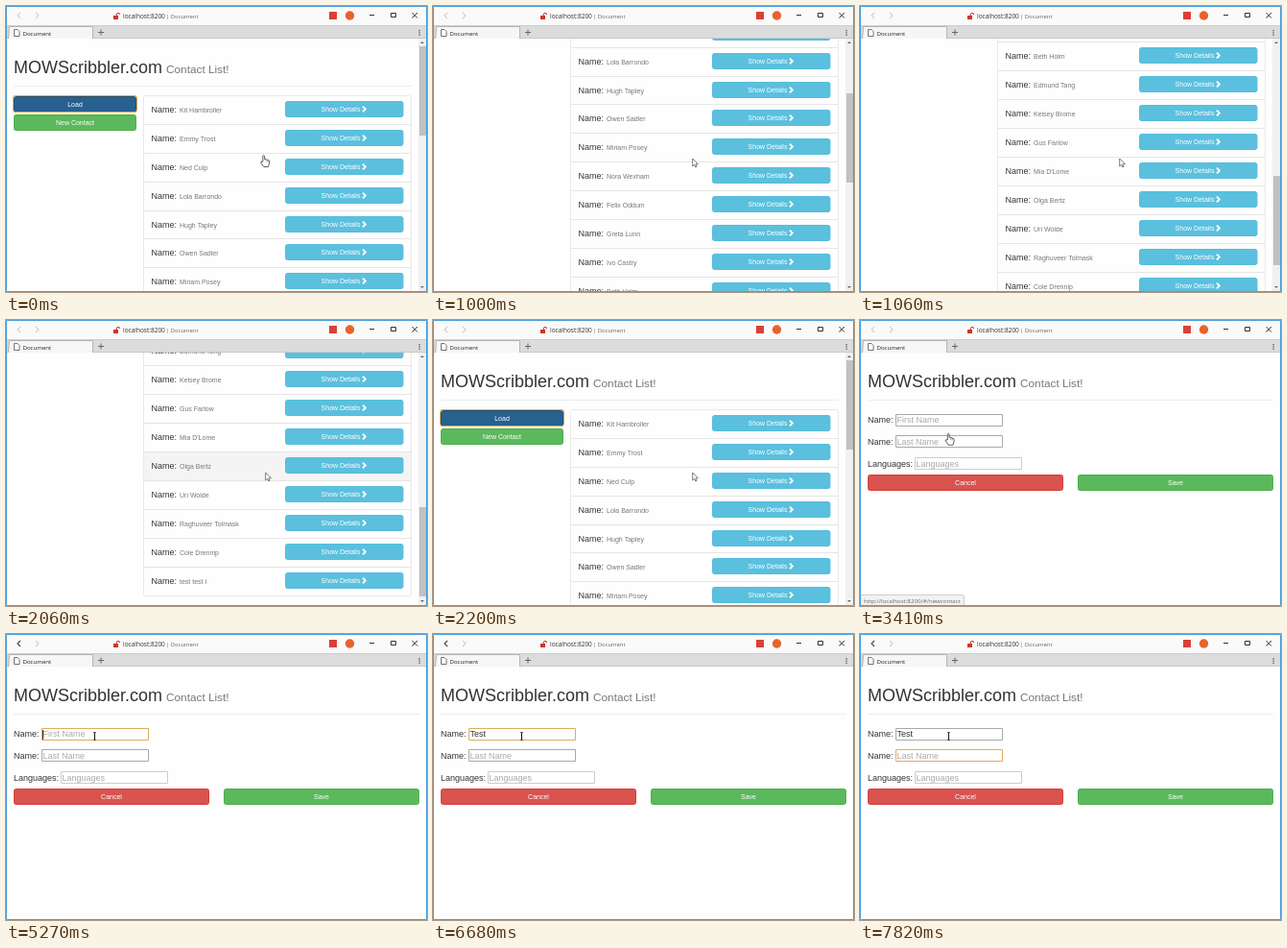
These frames come from a looping animation (439 by 298 pixels, 8 s). An HTML page with a canvas:

```html
<!DOCTYPE html>
<html lang="en">
<head>
<meta charset="utf-8">
<title>Document</title>
<style>
  html, body { margin: 0; width: 100%; height: 100%; overflow: hidden; background: #fefefe; }
  canvas { display: block; width: 439px; height: 298px; }
</style>
</head>
<body>
<canvas id="stage"></canvas>
<script>
const W = 439, H = 298, LOOP = 8000;
const SANS = '"Liberation Sans", Arial, sans-serif';
const UI = '"Open Sans", "Noto Sans", sans-serif';
const canvas = document.getElementById('stage');
const ctx = canvas.getContext('2d');
const dpr = window.devicePixelRatio || 1;
canvas.width = W * dpr;
canvas.height = H * dpr;

const PAGE_TOP = 34, LIST_TOP = 93.7, PITCH = 29.95, MAX_SCROLL = 435;
const people = [
  'Kit Hambroller', 'Emmy Trost', 'Ned Culp', 'Lola Barrondo', 'Hugh Tapley',
  'Owen Sadler', 'Miriam Posey', 'Nora Wexham', 'Felix Oddum', 'Greta Lunn',
  'Ivo Castry', 'Beth Holm', 'Edmund Tang', 'Kelsey Brome', 'Gus Farlow',
  'Mia D\'Lome', 'Olga Bertz', 'Uri Wolde', 'Raghuveer Tolmask', 'Cole Drennip',
  'test test l'
];

// Step tracks: [start time, value]
const scrollTrack = [
  [0, 0], [1000, 140], [1030, 275], [1060, 385], [1100, 421], [1130, MAX_SCROLL],
  [2100, 300], [2130, 150], [2160, 40], [2200, 0]
];
const typedTrack = [[0, ''], [5510, 'T'], [5620, 'Te'], [5790, 'Tes'], [6170, 'Test']];
const caretTrack = [
  [0, false], [4270, true], [4790, false], [5270, true], [5790, false],
  [6000, true], [6680, false], [7310, true], [7820, false]
];

function at(track, t) {
  let value = track[0][1];
  for (const [start, v] of track) if (t >= start) value = v;
  return value;
}

// Eased 0..1 progress, advanced in a number of discrete steps
function glide(t, start, end, steps) {
  if (t < start) return 0;
  if (t >= end) return 1;
  const q = (Math.floor((t - start) / (end - start) * (steps - 1)) + 1) / steps;
  return q * q * (3 - 2 * q);
}

const mix = (a, b, p) => a + (b - a) * p;

function text(s, x, y, size, color, align = 'left', font = SANS) {
  ctx.font = `${size}px ${font}`;
  ctx.fillStyle = color;
  ctx.textAlign = align;
  ctx.fillText(s, x, y);
}

function rect(x, y, w, h, color) {
  ctx.fillStyle = color;
  ctx.fillRect(x, y, w, h);
}

function box(x, y, w, h, fill, stroke, r = 0) {
  ctx.beginPath();
  ctx.roundRect(x + 0.5, y + 0.5, w - 1, h - 1, r);
  if (fill) { ctx.fillStyle = fill; ctx.fill(); }
  if (stroke) { ctx.strokeStyle = stroke; ctx.lineWidth = 1; ctx.stroke(); }
}

function path(points, color, line = 1, fill, closed) {
  ctx.beginPath();
  points.forEach(([x, y], i) => i ? ctx.lineTo(x, y) : ctx.moveTo(x, y));
  if (closed) ctx.closePath();
  if (fill) { ctx.fillStyle = fill; ctx.fill(); }
  if (color) { ctx.strokeStyle = color; ctx.lineWidth = line; ctx.stroke(); }
}

function button(label, x, y, w, fill, stroke, labelX = x + w / 2) {
  box(x, y, w, 17, fill, stroke, 2);
  text(label, labelX, y + 11, 7, '#fff', 'center');
}

function chrome(backActive) {
  rect(0, 0, W, 20, '#fafafa');
  rect(0, 20, W, 14, '#dcdcdc');
  rect(0, 20, W, 1, '#cdcdcd');
  rect(0, 33, W, 1, '#c8c8c8');

  path([[15, 7], [12, 10], [15, 13]], backActive ? '#444' : '#d0d0d0', 1.1);
  path([[31, 7], [34, 10], [31, 13]], '#d0d0d0', 1.1);

  rect(112, 10, 5, 4, '#c9382b');
  ctx.beginPath();
  ctx.arc(117, 9, 1.7, Math.PI, 0);
  ctx.moveTo(115.3, 9);
  ctx.lineTo(115.3, 10.5);
  ctx.strokeStyle = '#c9382b';
  ctx.lineWidth = 1;
  ctx.stroke();
  text('localhost:8200', 122, 13, 6.5, '#333', 'left', UI);
  text('| Document', 167, 13, 5.9, '#666', 'left', UI);

  rect(337, 6, 8, 8, '#d8413a');
  ctx.beginPath();
  ctx.arc(358.5, 10, 4.7, 0, Math.PI * 2);
  ctx.fillStyle = '#e8622c';
  ctx.fill();

  rect(379, 9, 5, 1, '#333');
  box(401, 7, 6, 5, null, '#333');
  path([[423.5, 7], [429, 12.5]], '#333');
  path([[429, 7], [423.5, 12.5]], '#333');

  path([[2.5, 34], [3.5, 21.5], [90.5, 21.5], [90.5, 34]], '#b5b5b5', 1, '#f6f6f6');
  path([[8.5, 24.5], [12, 24.5], [14, 26.5], [14, 31.5], [8.5, 31.5]], '#666', 0.9, '#fff', true);
  text('Document', 17.5, 31, 6.1, '#222', 'left', UI);
  rect(96, 27, 6, 1, '#666');
  rect(98.5, 24.5, 1, 6, '#666');
  for (const y of [25, 27.3, 29.6]) rect(430.5, y, 1.3, 1.3, '#555');
}

function header(right) {
  text('MOWScribbler.com', 8, 69.7, 18, '#333');
  text('Contact List!', 167, 69.7, 11.8, '#777');
  rect(8, 83, right - 8, 1, '#ececec');
}

function contactRow(name, i, hovered) {
  const y = Math.round(LIST_TOP + i * PITCH);
  if (hovered) rect(144, y, 279, Math.round(PITCH), '#f4f4f5');
  if (i) rect(144, y - 1, 279, 1, '#e6e6e6');
  text('Name:', 151.5, y + 17, 9, '#333');
  text(name, 181, y + 17, 7, '#777');
  button('Show Details', 291, y + 5, 123.5, '#5bc0de', '#56bddc', 349);
  path([[372, y + 10.7], [374.8, y + 13.5], [372, y + 16.3]], '#fff', 1.9);
}

function scrollbar(scroll) {
  rect(430, PAGE_TOP, 8, H - PAGE_TOP, '#f1f1f1');
  rect(431, Math.round(42 + scroll / MAX_SCROLL * 153), 7, 93, '#c1c1c1');
  path([[432, 39], [434, 37], [436, 39]], null, 0, '#666', true);
  path([[432, 292], [434, 294], [436, 292]], null, 0, '#666', true);
}

function listPage(t, pointer) {
  const scroll = at(scrollTrack, t);
  const pressed = t >= 3310;
  const overNew = t >= 2480 && pointer.x < 136 && pointer.y > 113 && pointer.y < 131;
  const moving = t >= 2480 && pointer.x > 144;
  const hoverRow = t >= 2060 && t < 2100 ? 16
    : moving ? Math.floor((pointer.y - LIST_TOP) / PITCH) : -1;

  ctx.save();
  ctx.translate(0, -scroll);
  header(423);
  if (pressed) {
    button('Load', 8, 94, 128, '#337ab7', '#2e6da4');
  } else {
    button('Load', 8, 94, 128, '#286090', '#204d74');
    box(7, 93, 130, 18, null, '#d9a957', 2);
  }
  button('New Contact', 8, 113, 128,
    pressed ? '#398439' : overNew ? '#449d44' : '#5cb85c',
    overNew ? '#398439' : '#4cae4c');
  if (pressed) box(7, 112, 130, 19, null, '#d9a957', 2);
  people.forEach((name, i) => contactRow(name, i, i === hoverRow));
  box(143, 93, 280, Math.round(people.length * PITCH) + 1, null, '#e9e9e9', 2);
  ctx.restore();

  scrollbar(scroll);
  if (overNew) statusBar();
}

function statusBar() {
  box(0, 286, 109, 12, '#f2f2f2', '#cfcfcf', 1);
  text('http://localhost:8200/#/newcontact', 4, 295, 6.15, '#666', 'left', UI);
}

function field(label, x, y, hint, border, value, caret) {
  const top = Math.floor(y), base = Math.round(y + 9.2);
  text(label, 8, base, 9, '#333');
  box(x, top, 112, 13, '#fff', border);
  text(value || hint, x + 1.5, base, 9, value ? '#333' : '#a9a9a9');
  if (caret) {
    const end = value ? ctx.measureText(value).width : 0;
    rect(Math.round(x + 1.3 + end), top + 2, 1, 10, '#333');
  }
}

function formPage(t) {
  const focus = t < 4270 ? 0 : t < 7310 ? 1 : 2;
  const caret = at(caretTrack, t);
  const border = n => focus === n ? '#dcae5c' : '#a9a9a9';
  header(431);
  field('Name:', 37, 98, 'First Name', border(1), at(typedTrack, t), caret && focus === 1);
  field('Name:', 37, 120.9, 'Last Name', border(2), '', caret && focus === 2);
  field('Languages:', 57, 143.4, 'Languages', '#cccccc', '', false);
  button('Cancel', 8, 161, 204, '#d9534f', '#d43f3a');
  button('Save', 227, 161, 204, '#5cb85c', '#4cae4c');
  if (t < 3510) statusBar();
}

function hand(x, y) {
  ctx.save();
  ctx.translate(x, y);
  ctx.lineJoin = 'round';
  path([
    [-2.2, 1], [-2.2, -5], [-1.3, -5.8], [-0.4, -5], [-0.4, -1.6], [1, -1.8], [1.5, -1.2],
    [2.6, -1.3], [3, -0.6], [4.2, -0.4], [4.6, 0.5], [4.4, 3.4], [3.4, 6.3], [-1.2, 6.3],
    [-4.4, 1.8], [-4, 0.8], [-3.2, 0.8]
  ], '#333', 0.8, '#fff', true);
  path([[1.2, -1], [1.2, 1]], '#555', 0.5);
  path([[2.8, -0.6], [2.8, 1.2]], '#555', 0.5);
  ctx.restore();
}

function arrow(x, y) {
  path([
    [x, y], [x, y + 8], [x + 1.9, y + 6.3], [x + 3.1, y + 9], [x + 4.3, y + 8.4],
    [x + 3.2, y + 5.9], [x + 5.6, y + 5.7]
  ], '#444', 0.7, '#fff', true);
}

function beam(x, y) {
  rect(x - 0.5, y - 4, 1, 8, '#111');
  rect(x - 1.5, y - 4.5, 3, 0.8, '#444');
  rect(x - 1.5, y + 3.7, 3, 0.8, '#444');
}

function pointerAt(t) {
  const toButton = glide(t, 2480, 3060, 18);
  const toField = glide(t, 3790, 4270, 12);
  return {
    x: mix(mix(270, 93.5, toButton), 92.5, toField),
    y: mix(mix(161.3, 124, toButton), 106.5, toField)
  };
}

function drawPointer(t, p) {
  if (t >= 1000 && t < 2310) arrow(270.7, 159);
  else if (t < 3510) hand(p.x, p.y);
  else beam(p.x, p.y);
}

function draw(t) {
  const pointer = pointerAt(t);
  ctx.setTransform(dpr, 0, 0, dpr, 0, 0);
  rect(0, 0, W, H, '#fefefe');

  ctx.save();
  ctx.beginPath();
  ctx.rect(0, PAGE_TOP, W, H - PAGE_TOP);
  ctx.clip();
  if (t < 3410) listPage(t, pointer);
  else formPage(t);
  ctx.restore();

  chrome(t >= 3510);
  drawPointer(t, pointer);
  box(0, 0, W, H, null, '#4f9fde');
}

const begin = performance.now();
function tick() {
  draw((performance.now() - begin) % LOOP);
  requestAnimationFrame(tick);
}
tick();
</script>
</body>
</html>
```
